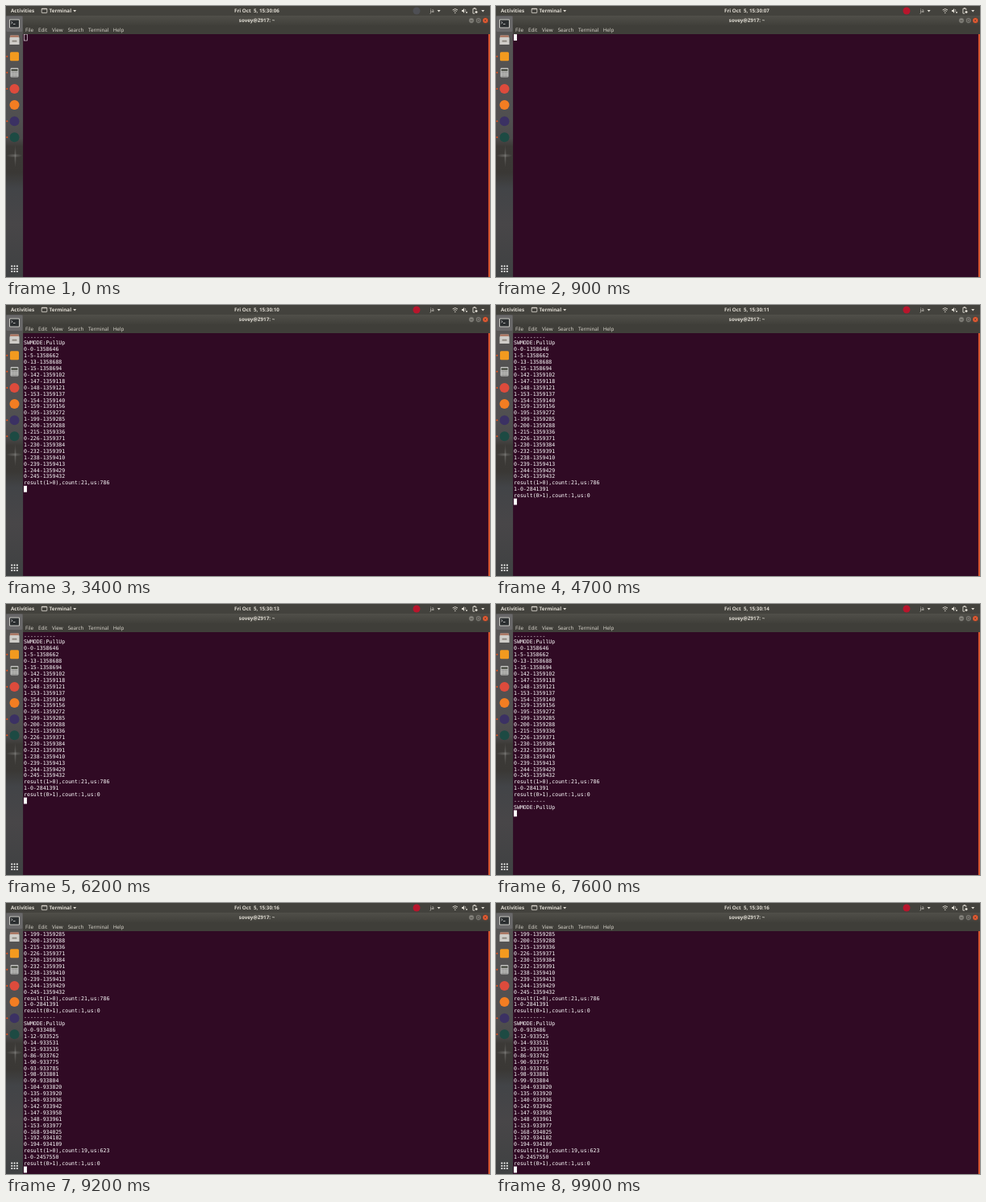
These frames come from a looping animation (600 by 337 pixels, 10 s). An HTML page:

```html
<!DOCTYPE html>
<html lang="en">
<head>
<meta charset="utf-8">
<title>Terminal</title>
<style>
  html, body { margin: 0; width: 100%; height: 100%; overflow: hidden; background: #300a24; }
  svg { display: block; width: 600px; height: 337px; }
  text { font: 6.25px "Open Sans", "Noto Sans", sans-serif; fill: #dfdbd2; white-space: pre; text-rendering: geometricPrecision; }
  .bold { font-weight: 700; }
  .mid { text-anchor: middle; }
  #lines text { font: 6.567px "DejaVu Sans Mono", monospace; fill: #fff; }
</style>
</head>
<body>
<svg viewBox="0 0 600 337">
  <defs>
    <linearGradient id="dock" x2="0" y2="1">
      <stop offset="0" stop-color="#565554"/>
      <stop offset=".4" stop-color="#504f50"/>
      <stop offset=".47" stop-color="#4b4a4a"/>
      <stop offset=".5" stop-color="#3c3a37"/>
      <stop offset=".6" stop-color="#3a3835"/>
      <stop offset=".66" stop-color="#424447"/>
      <stop offset=".8" stop-color="#484648"/>
      <stop offset="1" stop-color="#3f4142"/>
    </linearGradient>
    <linearGradient id="title" x2="0" y2="1">
      <stop offset="0" stop-color="#504f49"/>
      <stop offset="1" stop-color="#403f3a"/>
    </linearGradient>
    <radialGradient id="glow">
      <stop offset="0" stop-color="#a3a3a0" stop-opacity=".4"/>
      <stop offset="1" stop-color="#a3a3a0" stop-opacity="0"/>
    </radialGradient>
    <clipPath id="screen"><rect x="21" y="35" width="577" height="302"/></clipPath>
    <path id="arrow" d="M-2-1.1h4L0 1.4z" fill="#dfdbd2"/>
  </defs>

  <!-- terminal -->
  <rect x="21" y="35" width="577" height="302" fill="#300a24"/>
  <g clip-path="url(#screen)">
    <g id="lines"></g>
    <rect id="cursor" width="3.95" height="7.9"/>
  </g>
  <rect x="597.9" y="35" width="2.1" height="302" fill="#d5542f"/>

  <!-- dock -->
  <rect y="12" width="21.1" height="325" fill="url(#dock)"/>
  <ellipse cx="10.5" cy="186" rx="10" ry="2.5" fill="url(#glow)"/>
  <ellipse cx="11.5" cy="187" rx="1.5" ry="14" fill="url(#glow)"/>
  <rect x=".5" y="12.5" width="20" height="19.5" rx="1.5" fill="#696869"/>
  <rect x="4" y="16.5" width="13" height="11" rx="1.2" fill="#c9c8c3"/>
  <rect x="5" y="17.5" width="11" height="9" rx=".5" fill="#2b2e30"/>
  <path d="M6.5 19.5l1.6 1.2-1.6 1.2M9 22.5h2.5" fill="none" stroke="#eee" stroke-width=".7"/>
  <path d="M5.5 36.5h10l1 3.5v8H4.5v-8z" fill="#cfcdc9"/>
  <path d="M5.5 36.5h10l.6 2.2H4.9z" fill="#a9705a"/>
  <rect x="7.5" y="42.8" width="6" height="1.7" rx=".5" fill="#87827a"/>
  <rect x="5" y="57.2" width="11" height="11" rx="1.5" fill="#f39a1f"/>
  <rect x="5.6" y="77" width="9.8" height="11.6" rx="1" fill="#cfcfcd"/>
  <rect x="6.5" y="78.2" width="8" height="3" fill="#55584f"/>
  <path d="M6.8 82.8h7.5M6.8 85h7.5M6.8 87.1h7.5" stroke="#72726f" stroke-width="1.2" stroke-dasharray="1.5 .5"/>
  <circle cx="10.5" cy="103" r="6" fill="#dd4b3c"/>
  <circle cx="10.5" cy="123" r="6" fill="#f27d22"/>
  <circle cx="10.5" cy="143.2" r="6" fill="#3b3163"/>
  <circle cx="10.5" cy="163.3" r="6" fill="#1d4a43"/>
  <g id="running" fill="#e95420"></g>
  <g id="grid" fill="#f2f2f0"></g>

  <!-- window frame -->
  <rect x="21" y="12" width="579" height="12.5" fill="url(#title)"/>
  <rect x="21" y="24" width="579" height="11" fill="#3f3e39"/>
  <text class="bold mid" x="311" y="20.2">sovey@Z917: ~</text>
  <g stroke="#33322e" stroke-width=".5">
    <circle cx="577" cy="18" r="3.4" fill="#84827b"/>
    <circle cx="585.7" cy="18" r="3.4" fill="#84827b"/>
    <circle cx="594.3" cy="18" r="3.5" fill="#ed5c32"/>
  </g>
  <path d="M575.5 18.4h3M584.4 16.8h2.6v2.5h-2.6zM593.1 16.8l2.4 2.4m0-2.4l-2.4 2.4" fill="none" stroke="#3b3934" stroke-width=".7"/>
  <g id="menu"></g>

  <!-- top bar -->
  <rect width="600" height="12" fill="#43423d"/>
  <text class="bold" x="6" y="8.3">Activities</text>
  <rect x="44.2" y="3.2" width="6.6" height="5.4" rx=".6" fill="none" stroke="#dfdbd2" stroke-width=".8"/>
  <path d="M44 3.7h7" stroke="#dfdbd2"/>
  <text class="bold" x="53.5" y="8.3">Terminal</text>
  <use href="#arrow" x="85.2" y="6"/>
  <text class="bold" id="clock" x="283" y="8.3"></text>
  <circle id="tray" cx="509" cy="6" r="4.5"/>
  <text x="525.7" y="8.3">ja</text>
  <use href="#arrow" x="536.6" y="6"/>
  <g fill="none" stroke="#dfdbd2" stroke-width=".9">
    <path d="M553.6 5q3.2-2.9 6.4 0M554.9 6.6q1.9-1.7 3.8 0"/>
    <path d="M569.2 4q1.4 1.4 0 3" stroke-width=".6"/>
    <path d="M570 7l2 2m0-2l-2 2" stroke-width=".7"/>
    <path d="M582.8 5V3.3h-3.9v5.9h2.2M579.8 2.6h2"/>
  </g>
  <path d="M556.8 9.2l-1.1-1.3h2.2zM565 4.9h1.2l1.9-1.8v5.8l-1.9-1.8H565z" fill="#dfdbd2"/>
  <circle cx="583" cy="7.4" r="1.5" fill="#dfdbd2"/>
  <use href="#arrow" x="591.2" y="6"/>
</svg>
<script>
const LOOP = 10000, ROWS = 38, ROW = 7.905, TOP = 35.1, BASELINE = 6.4, LEFT = 22;
const $ = id => document.getElementById(id);

function add(parent, tag, attrs, content = '') {
  const el = document.createElementNS('http://www.w3.org/2000/svg', tag);
  for (const key in attrs) el.setAttribute(key, attrs[key]);
  el.textContent = content;
  return parent.appendChild(el);
}

// Switch bounces: level, sample count, microseconds
const bounces = (start, step, shift, counts) =>
  counts.map((n, i) => `${i % 2}-${n}-${start + Math.round(n * step + shift)}`);

const header = ['----------', 'SWMODE:PullUp'];
const release = us => ['1-0-' + us, 'result(0>1),count:1,us:0'];

const prints = [
  [1500, header],
  [2800, [...bounces(1358646, 3.21, 0, [0, 5, 13, 15, 142, 147, 148, 153, 154, 159, 195,
    199, 200, 215, 226, 230, 232, 238, 239, 244, 245]), 'result(1>0),count:21,us:786']],
  [4300, release(2841391)],
  [6800, header],
  [7700, [...bounces(933486, 3.2085, 0.4, [0, 12, 14, 15, 86, 90, 93, 98, 99, 104, 135,
    140, 142, 147, 148, 153, 168, 192, 194]), 'result(1>0),count:19,us:623']],
  [9200, release(2457550)]
];

const lines = prints.flatMap(([at, rows]) => rows.map(row => ({ at, row })));
lines.forEach((line, i) => {
  line.el = add($('lines'), 'text', { x: LEFT, y: TOP + BASELINE + i * ROW }, line.row);
});

[['File', 24], ['Edit', 40], ['View', 57], ['Search', 76.7], ['Terminal', 102], ['Help', 132.7]]
  .forEach(([name, x]) => add($('menu'), 'text', { x, y: 32.2 }, name));
[62.7, 82.8, 103, 143.2, 163.3].forEach(cy => add($('running'), 'circle', { cx: 1.3, cy, r: 1 }));
for (let i = 0; i < 9; i++) {
  add($('grid'), 'rect', { x: 6.3 + i % 3 * 3.3, y: 322.6 + Math.floor(i / 3) * 3.3, width: 1.9, height: 1.9, rx: 0.4 });
}

function draw() {
  const t = performance.now() % LOOP;
  const active = t >= 100;
  const count = lines.filter(line => line.at <= t).length;
  const scroll = Math.max(0, count - ROWS + 1);

  lines.forEach((line, i) => {
    line.el.setAttribute('visibility', i >= scroll && i < count ? 'visible' : 'hidden');
  });
  $('lines').setAttribute('transform', `translate(0 ${-scroll * ROW})`);

  const cursor = $('cursor');
  cursor.setAttribute('x', LEFT + (active ? 0 : 0.3));
  cursor.setAttribute('y', TOP + (count - scroll) * ROW);
  cursor.setAttribute('fill', active ? '#fff' : 'none');
  cursor.setAttribute('stroke', active ? 'none' : '#fff');
  cursor.setAttribute('stroke-width', 0.6);

  const seconds = 7 + Math.floor((t - 100) / 1000);
  $('clock').textContent = 'Fri Oct  5, 15:30:' + String(seconds).padStart(2, '0');
  $('tray').setAttribute('fill', active ? '#b8152c' : '#4e4f54');
  requestAnimationFrame(draw);
}
draw();
</script>
</body>
</html>
```
